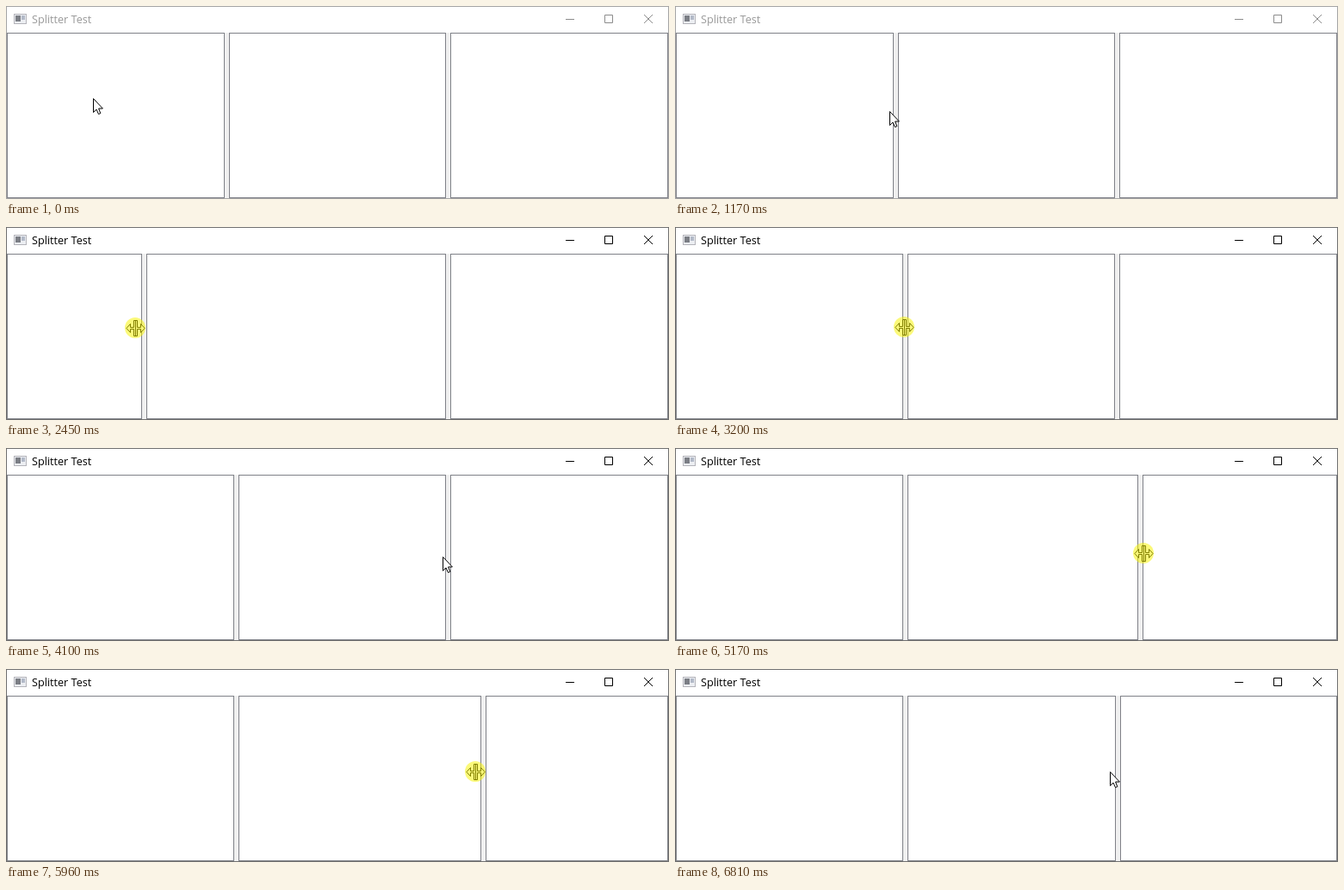
These frames come from a looping animation (770x224 px, 7270 ms). An HTML page:

```html
<!DOCTYPE html>
<html lang="en">
<head>
<meta charset="utf-8">
<title>Splitter Test</title>
<style>
html, body { margin: 0; width: 100%; height: 100%; overflow: hidden; background: #fff; }
svg { display: block; width: 770px; height: 224px; }
text { font: 12.65px "Open Sans", "Noto Sans", sans-serif; }
.pane { fill: #fff; stroke: #7f8188; }
.cursor { fill: #fff; stroke: #000; }
</style>
</head>
<body>
<svg viewBox="0 0 770 224">
  <rect width="770" height="224" fill="#fff"/>
  <rect y="31" width="770" height="192" fill="#f0f0f0"/>

  <g shape-rendering="crispEdges">
    <rect x="9" y="9" width="15" height="12" fill="#b4b4ba"/>
    <rect x="10" y="10" width="13" height="10" fill="#eceef2"/>
    <rect x="11" y="11" width="6" height="7" fill="#7b7e85"/>
    <rect x="18" y="11" width="4" height="5" fill="#b3bac8"/>
  </g>
  <text id="title" x="30" y="20">Splitter Test</text>
  <g id="buttons" fill="none">
    <path d="M650 15.5H660M695.5 10.5H704.5V19.5H695.5Z"/>
    <path d="M741 10L751 20M751 10L741 20"/>
  </g>

  <g shape-rendering="crispEdges">
    <rect id="pane1" class="pane" y="31.5" height="191"/>
    <rect id="pane2" class="pane" y="31.5" height="191"/>
    <rect id="pane3" class="pane" y="31.5" height="191"/>
    <rect id="frame" x=".5" y=".5" width="769" height="223" fill="none"/>
  </g>

  <g id="pointer">
    <path id="arrow" class="cursor" d="M.5 .5V16.5L4 13L6.5 18.5L8.8 17.6L6.6 12H11.4Z"/>
    <g id="resize" class="cursor" transform="translate(.5 .5)">
      <path d="M-10.6 0L-6 -5V-1H-2V-9H2V-1H6V-5L10.6 0L6 5V1H2V9H-2V1H-6V5Z"/>
      <path d="M0 -9V9"/>
    </g>
    <circle id="glow" r="12" fill="#f8f400" fill-opacity=".52"/>
  </g>
</svg>
<script>
const LOOP = 7270, STEP = 70, LAG = 25;
const $ = id => document.getElementById(id);
const set = (id, attrs) => {
  for (const k in attrs) $(id).setAttribute(k, attrs[k]);
};
const show = (id, on) => set(id, { visibility: on ? "visible" : "hidden" });
const within = (t, a, b) => t >= a && t < b;

const glide = u => (1 - Math.cos(Math.PI * u)) / 2;
const flick = u => 1 - (1 - u) ** 2;

// Pointer strokes: start, end, where it ends up, easing
const strokes = [
  [130, 620, 235, 126, glide],
  [820, 1170, 249, 122, glide],
  [1500, 1500, 253, 122, glide],
  [1770, 1770, 255, 121, glide],
  [2100, 2590, 126, 116, glide],
  [2770, 3200, 266, 116, glide],
  [3400, 4100, 507, 126, glide],
  [4360, 4360, 508, 126, glide],
  [4690, 4760, 512, 124, glide],
  [5030, 5720, 601, 119, flick],
  [5820, 6150, 513, 119, flick],
  [6680, 6810, 505, 119, glide]
];

function pointer(t) {
  let x = 101, y = 107;
  for (const [from, to, endX, endY, ease] of strokes) {
    if (t < from) break;
    const k = t < to ? ease((t - from) / (to - from)) : 1;
    x += (endX - x) * k;
    y += (endY - y) * k;
  }
  return { x: Math.round(x), y: Math.round(y) };
}

// The screen refreshes in even steps during a stroke and rests between
function refresh(t) {
  const stroke = strokes.filter(s => s[0] <= t).pop();
  if (!stroke) return { now: 0, late: 0 };
  const [from, to] = stroke;
  if (t >= to) return { now: to, late: to };
  const gap = (to - from) / Math.round((to - from) / STEP);
  const now = from + Math.floor((t - from) / gap) * gap;
  return { now, late: now - LAG };
}

// A sash trails the pointer while it is dragged
function sash(late, from, to, before) {
  return late < from ? before : pointer(Math.min(late, to)).x - 2;
}

function pane(id, left, right) {
  set(id, { x: left + .5, width: right - left });
}

function draw(t) {
  const { now, late } = refresh(t);
  const p = pointer(now);

  const active = t >= 2100;
  set("title", { fill: active ? "#000" : "#999" });
  set("buttons", { stroke: active ? "#000" : "#8c8c8c" });
  set("frame", { stroke: active ? "#707070" : "#a5a5a5" });

  const a = sash(late, 2100, 3200, 253);
  const b = sash(late, 5030, 6150, 510);
  pane("pane1", 1, a);
  pane("pane2", a + 6, b);
  pane("pane3", b + 6, 768);

  const sizing = within(t, 1770, 3470) || within(t, 4760, 6680);
  show("arrow", !sizing);
  show("resize", sizing);
  show("glow", within(t, 2100, 3400) || within(t, 5030, 6480));
  set("pointer", { transform: `translate(${p.x} ${p.y})` });
}

const start = performance.now();
function tick() {
  draw((performance.now() - start) % LOOP);
  requestAnimationFrame(tick);
}
tick();
</script>
</body>
</html>
```
